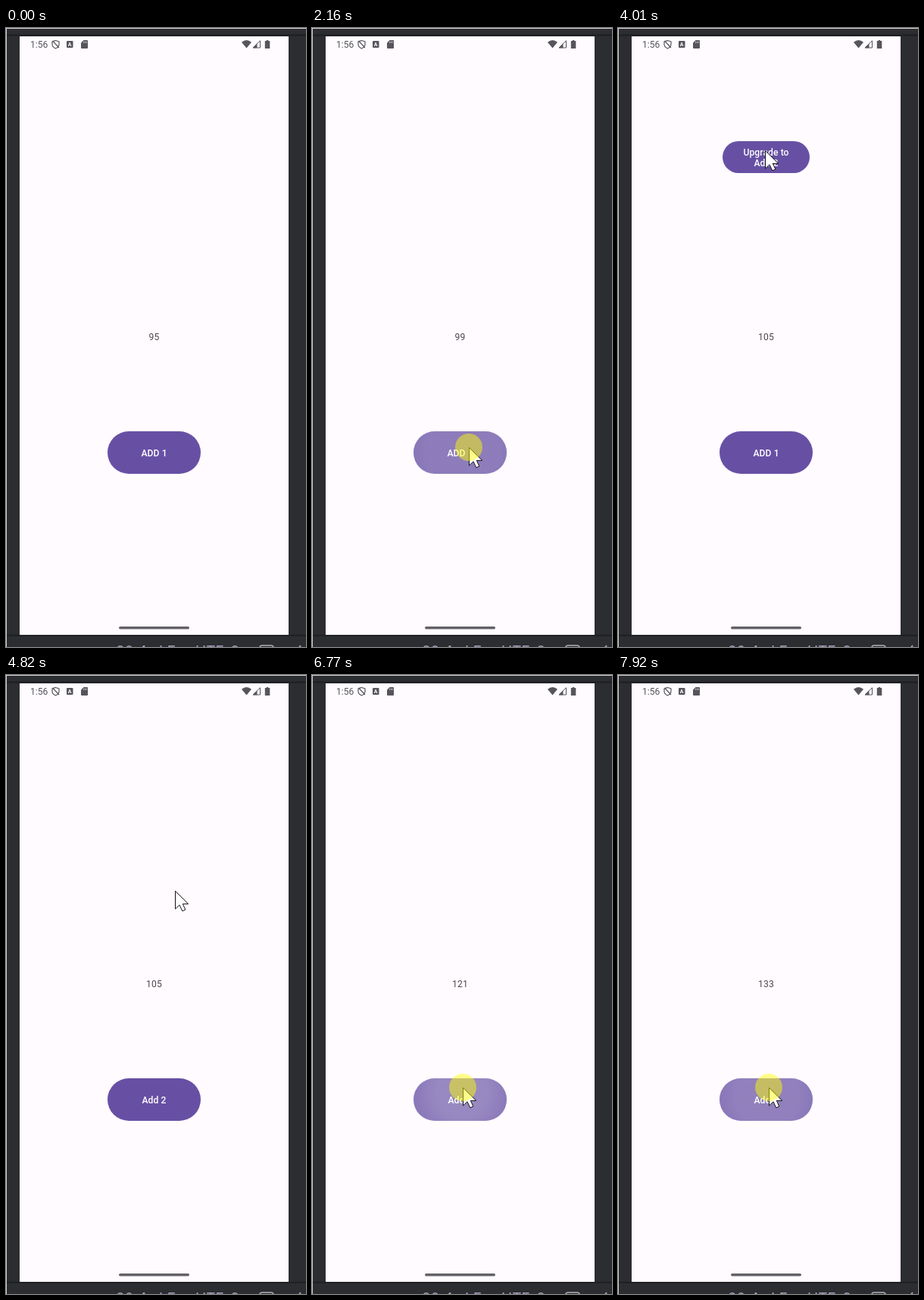
These frames come from a looping animation (396 by 815 pixels, 7.99 s). An HTML page:

```html
<!DOCTYPE html>
<html lang="en">
<head>
<meta charset="utf-8">
<title>Tap counter</title>
<style>
  html, body { margin: 0; width: 100%; height: 100%; overflow: hidden; background: #2b2d30; }
  svg { display: block; font: 12.1px Roboto, sans-serif; }
  .label { font-weight: 500; fill: #fff; text-anchor: middle; letter-spacing: .09px; }
  .pill { fill: #6750a4; }
</style>
</head>
<body>
<svg width="396" height="815" viewBox="0 0 396 815">
  <defs>
    <radialGradient id="glow">
      <stop offset=".45" stop-color="#fff"/>
      <stop offset="1" stop-color="#fff" stop-opacity="0"/>
    </radialGradient>
    <clipPath id="addClip"><rect x="134" y="531" width="123" height="56" rx="28"/></clipPath>
    <clipPath id="upgradeClip"><rect x="138" y="149" width="115" height="42" rx="21"/></clipPath>
  </defs>

  <!-- Window around the device -->
  <rect width="396" height="815" fill="#d4d4d6"/>
  <rect x="1" y="1" width="395" height="814" fill="#2b2d30"/>
  <path d="M1 9.5H396M1 799.8H396" stroke="#1e1f22" stroke-width="2"/>
  <rect x="18" y="11" width="355" height="788" fill="#fffbff"/>
  <g fill="#a79fbd" font-family="Inter, sans-serif" font-size="19">
    <text x="145" y="826.5">20:4</text>
    <text x="202" y="826.5">LF</text>
    <text x="250" y="826.5">UTF-8</text>
  </g>
  <rect x="335" y="813" width="18" height="14" rx="3" fill="none" stroke="#b5b2bd" stroke-width="1.5"/>
  <path d="M385 818L389 813" stroke="#a79fbd" stroke-width="2"/>

  <!-- Status bar -->
  <g fill="#57555c">
    <text x="32" y="25.5">1:56</text>
    <path d="M65.5 16.5L70 18V21.5Q70 25 65.5 27Q61 25 61 21.5V18ZM61.5 17L70 26" fill="none" stroke="#57555c" stroke-width="1.2"/>
    <rect x="80" y="17" width="8.5" height="9" rx="1"/>
    <text x="84.2" y="24.2" fill="#fffbff" font-size="7" font-weight="700" text-anchor="middle">A</text>
    <path d="M102.5 16H107Q108 16 108 17V26Q108 27 107 27H100Q99 27 99 26V19.5Z"/>
    <path d="M102.5 17.5V20M104.5 17.5V20M106.3 17.5V20" stroke="#fffbff" stroke-width=".6"/>
    <path d="M317.5 26.5L311 18.7Q317.5 13.5 324 18.7Z"/>
    <path d="M326 26L335.5 16.8V26Z" fill="none" stroke="#57555c"/>
    <path d="M326 26.3L331.5 20.8V26.3Z"/>
    <path d="M343.8 16H346.2V17H348.3V27H341.8V17H343.8Z"/>
  </g>
  <rect x="149" y="788" width="93" height="3.4" rx="1.7" fill="#656168"/>

  <!-- App -->
  <text id="count" x="195.6" y="410.5" text-anchor="middle" fill="#4b4751" letter-spacing=".22"></text>
  <g id="upgrade">
    <rect class="pill" x="138" y="149" width="115" height="42" rx="21"/>
    <g id="upgradeRipples" clip-path="url(#upgradeClip)"></g>
    <text class="label" x="195.5" y="167.7">Upgrade to</text>
    <text class="label" x="195.5" y="181.8">Add 2</text>
  </g>
  <rect class="pill" x="134" y="531" width="123" height="56" rx="28"/>
  <g id="addRipples" clip-path="url(#addClip)"></g>
  <text id="addLabel" class="label" x="195.5" y="563.8"></text>

  <g id="pointer">
    <path d="M.5 .5V24L6 18.8L9.8 26.8L13.8 25L10.3 17.4H17.7Z" fill="#fff" stroke="#111"/>
    <circle id="halo" r="18" fill="#ff0" fill-opacity=".47"/>
  </g>
</svg>
<script>
const LOOP = 7990, TICK = 68, PRESS = 95, RIPPLE_LAG = 100, COUNT_LAG = 130;
const UPGRADE_SHOWN = 2218, UPGRADE_PRESS = 4200, UPGRADE_DONE = 4400;

const series = (start, step, n) => Array.from({ length: n }, (_, i) => start + i * step);
const slowTaps = series(1340, 187, 10);
const fastTaps = [...series(5460, 160, 8), ...series(6740, 190, 7)];
const allTaps = [...slowTaps, UPGRADE_PRESS, ...fastTaps];

// Pointer strokes: quadratic curves between resting points
const entry = [363, 731], onAdd = [207, 552], onUpgrade = [194, 161], nearAdd = [232, 542], onAddAgain = [199, 543];
const strokes = [
  { start: 250, end: 790, from: entry, bend: [315, 555], to: onAdd },
  { start: 3200, end: 3880, from: onAdd, bend: [210, 300], to: onUpgrade },
  { start: 4750, end: 4960, from: onUpgrade, bend: [250, 343], to: nearAdd },
  { start: 5055, end: 5250, from: nearAdd, bend: [215, 536], to: onAddAgain }
];

const byId = id => document.getElementById(id);
const clamp = v => Math.min(1, Math.max(0, v));
const show = (id, visible) => byId(id).style.display = visible ? "" : "none";
const countDone = (taps, t) => taps.filter(p => t >= p + COUNT_LAG).length;

function pointerAt(t) {
  const stroke = strokes.findLast(s => t >= s.start);
  if (!stroke) return null;
  const { start, end, from, bend, to } = stroke;
  const steps = Math.round((end - start) / TICK);
  const k = Math.floor(clamp((t - start) / (end - start)) * steps + 1e-6) / steps;
  return from.map((a, i) => (1 - k) ** 2 * a + 2 * k * (1 - k) * bend[i] + k * k * to[i]);
}

function ripples(taps, t, centerY) {
  return taps.map(press => {
    const age = t - press - RIPPLE_LAG;
    if (age <= 0 || age >= 450) return "";
    const [px, py] = pointerAt(press);
    const grow = clamp(age / 225);
    const alpha = .16 * clamp(age / 75) * clamp((450 - age) / 150);
    const x = px + (195.5 - px) * grow, y = py + (centerY - py) * grow;
    return `<circle cx="${x}" cy="${y}" r="${30 + 110 * grow}" fill="url(#glow)" opacity="${alpha}"/>`;
  }).join("");
}

function draw(t) {
  const upgraded = t >= UPGRADE_DONE;
  byId("count").textContent = 95 + countDone(slowTaps, t) + 2 * countDone(fastTaps, t);
  byId("addLabel").textContent = upgraded ? "Add 2" : "ADD 1";
  byId("addRipples").innerHTML = ripples([...slowTaps, ...fastTaps], t, 559);
  byId("upgradeRipples").innerHTML = ripples([UPGRADE_PRESS], t, 170);
  show("upgrade", t >= UPGRADE_SHOWN && !upgraded);

  const position = pointerAt(t);
  show("pointer", position);
  show("halo", allTaps.some(p => t >= p && t < p + PRESS));
  if (position) byId("pointer").setAttribute("transform", `translate(${position.map(Math.round)})`);
}

const began = performance.now();
function frame() {
  draw((performance.now() - began) % LOOP);
  requestAnimationFrame(frame);
}
frame();
</script>
</body>
</html>
```
